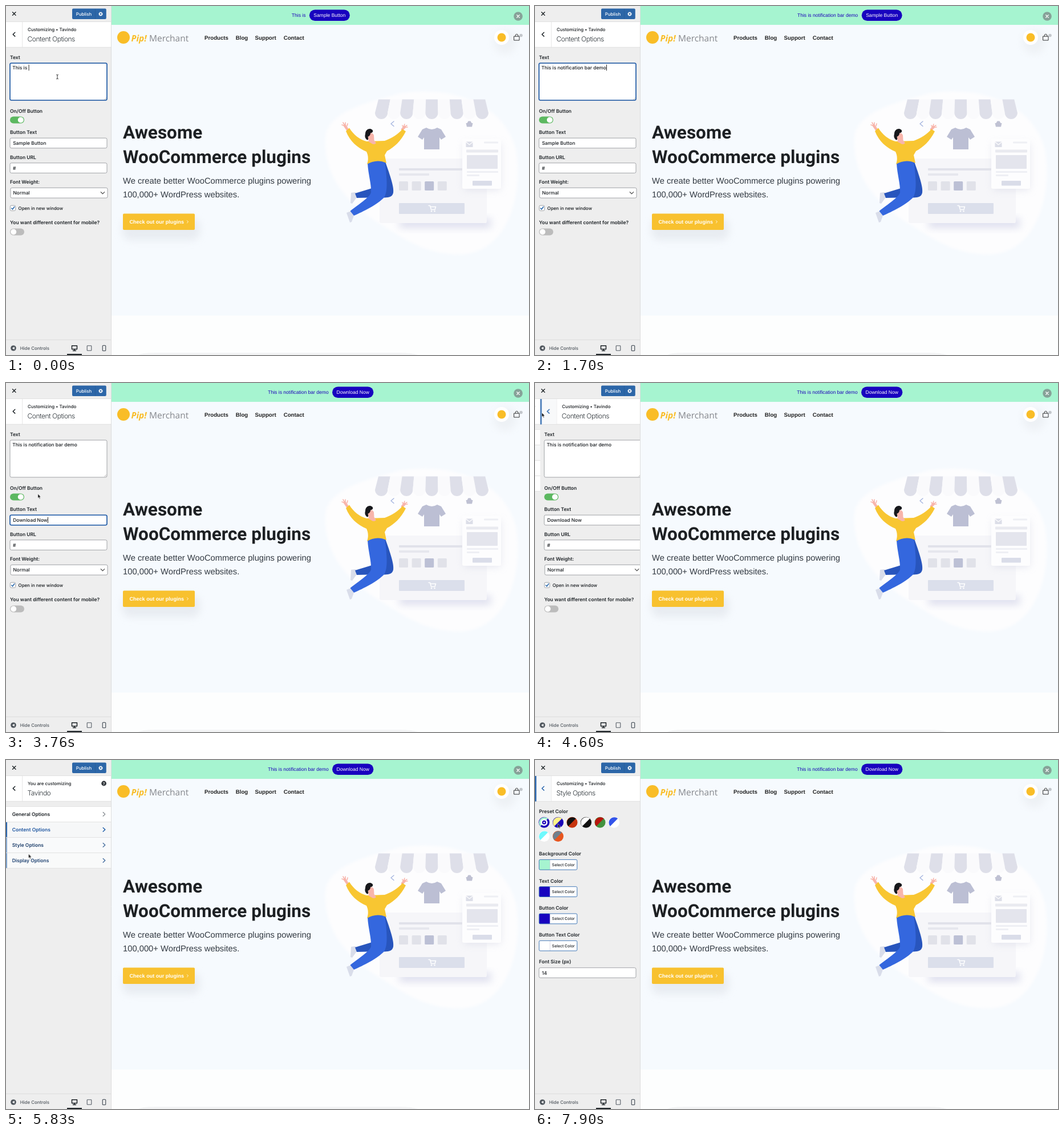
An HTML page that plays this animation: 917 by 611 pixels, repeating every 8000 ms.

```html
<!DOCTYPE html>
<html lang="en">
<head>
<meta charset="utf-8">
<title>Bar customizer</title>
<style>
html, body { margin: 0; width: 100%; height: 100%; overflow: hidden; background: #fdfefe; }
svg { display: block; width: 917px; height: 611px; }
text { font: 450 8.4px Inter, sans-serif; fill: #15191d; white-space: pre; text-rendering: geometricPrecision; }
.b { font-size: 8.52px; font-weight: 600; fill: #1d2226; }
.s { font-size: 7.88px; }
.title { font-size: 12px; font-weight: 300; letter-spacing: -.48px; fill: #2c3338; }
.ar, .nav { font-family: "Liberation Sans", Arial, sans-serif; }
.nav { font-size: 9.7px; font-weight: 700; fill: #222; }
.bar { font-size: 8.55px; fill: #1c02b8; }
.lead { font-size: 14.75px; fill: #333a42; }
.h1 { font: 700 31.5px Roboto, sans-serif; fill: #1d2023; }
.brand { font: 400 15.5px "Open Sans", sans-serif; fill: #85878c; }
.field { fill: #fff; stroke: #8c8f94; stroke-width: .8; }
.line { fill: none; stroke-linecap: round; stroke-linejoin: round; }
.blue { fill: #1d55a0; }
.focus { fill: none; stroke: #1f5cab; stroke-width: 1.6; }
.caret { fill: #111; }

#content, #list, #style, #mouse, .ibeam, .arrow, .hot { animation: 8s linear infinite; }
#content { animation-name: outRight; }
#list { animation-name: visit; }
#style { animation-name: inRight; }
#content, #list, #style { animation-timing-function: cubic-bezier(.645,.045,.355,1); }
@keyframes outRight { 0%, 57.085% { transform: none } 59.335%, 100% { transform: translateX(185px) } }
@keyframes visit {
  0%, 57.085% { transform: translateX(-185px) }
  59.335%, 82.881% { transform: none }
  85.131%, 100% { transform: translateX(-185px) }
}
@keyframes inRight { 0%, 82.881% { transform: translateX(185px) } 85.131%, 100% { transform: none } }

#mouse { animation-name: roam; }
@keyframes roam {
  0%, 21.5% { transform: translate(90px,124px) }
  24.5%, 45% { transform: translate(70px,241px) }
  53% { transform: translate(14px,55px) }
  54.5%, 66% { transform: translate(12px,52px) }
  69.5% { transform: translate(29px,109px) }
  72.875% { transform: translate(39.5px,164.5px) }
  75.5% { transform: translate(42px,153px) }
  77.9%, 88% { transform: translate(43px,151px) }
  92.5% { transform: translate(41px,114px) }
  95.7%, 100% { transform: translate(40px,111.5px) }
}
.ibeam { animation-name: ibeam; animation-timing-function: step-end; }
.arrow { animation-name: arrow; animation-timing-function: step-end; }
@keyframes ibeam {
  0% { opacity: 1 } 9.5% { opacity: 0 } 21.6% { opacity: 1 } 22.5% { opacity: 0 }
  24.2% { opacity: 1 } 28.1% { opacity: 0 } 45% { opacity: 1 } 45.5%, 100% { opacity: 0 }
}
@keyframes arrow {
  0% { opacity: 0 } 22.5% { opacity: 1 } 24.2% { opacity: 0 } 45.5%, 100% { opacity: 1 }
}
.hot.back1 { animation-name: back1; }
.hot.back2 { animation-name: back2; }
.hot.back3 { animation-name: back3; }
.hot.item0 { animation-name: item0; }
.hot.item1 { animation-name: item1; }
.hot.item2 { animation-name: item2; }
.hot.item3 { animation-name: item3; }
@keyframes back1 { 0%, 52.5% { opacity: 0 } 53.8%, 100% { opacity: 1 } }
@keyframes back2 { 0%, 59% { opacity: 0 } 60%, 67% { opacity: 1 } 68.5%, 100% { opacity: 0 } }
@keyframes back3 { 0%, 85.1% { opacity: 0 } 86.5%, 100% { opacity: 1 } }
@keyframes item0 { 0%, 67.9% { opacity: 0 } 69.3% { opacity: 1 } 70.8%, 100% { opacity: 0 } }
@keyframes item1 { 0%, 82% { opacity: 1 } 83.5%, 100% { opacity: 0 } }
@keyframes item2 {
  0%, 70.9% { opacity: 0 } 72%, 72.65% { opacity: 1 } 73.2%, 73.5% { opacity: 0 } 75%, 100% { opacity: 1 }
}
@keyframes item3 { 0%, 72.55% { opacity: 0 } 73.1%, 73.6% { opacity: 1 } 75%, 100% { opacity: 0 } }
</style>
</head>
<body>
<svg viewBox="0 0 917 611">
<defs>
  <filter id="soft" x="-40%" y="-60%" width="180%" height="220%"><feGaussianBlur stdDeviation="7"/></filter>
  <filter id="edge"><feGaussianBlur stdDeviation="2"/></filter>
  <clipPath id="side"><rect y="28" width="184" height="556"/></clipPath>
</defs>

<!-- page -->
<rect x="185" width="732" height="542" fill="#f6fafe"/>
<rect x="185" y="542" width="732" height="69" fill="#fdfefe"/>
<path d="M232 611Q238 607 262 607H690Q712 607 722 611" fill="#f3f4f5"/>
<rect x="185" width="732" height="33" fill="#a6f4d0"/>
<text id="note" class="ar bar" y="19.3"></text>
<rect id="pill" y="6.4" height="19.6" rx="9.8" fill="#1803bf"/>
<text id="pillText" class="ar bar" y="19.3" style="fill:#fff"></text>
<circle cx="898" cy="18" r="7.8" fill="#86a298"/>
<path d="M895.8 15.8l4.4 4.4m0-4.4l-4.4 4.4" class="line" stroke="#fff" stroke-width="1.3"/>

<circle cx="206" cy="55" r="11" fill="#f9bd27"/>
<text class="brand" x="219.5" y="62" style="font-weight:700;font-style:italic;fill:#f9bd27">Pip!</text>
<text class="brand" x="251" y="62">Merchant</text>
<g id="nav"></g>
<circle cx="875" cy="63" r="20" fill="#e3e6ea" opacity=".45" filter="url(#soft)"/>
<circle cx="869" cy="55" r="13" fill="#fff"/>
<circle cx="869" cy="55" r="7.5" fill="#f9bd27"/>
<path d="M891 53h9v7h-9zM893.3 53v-1.5a2.2 2.2 0 0 1 4.4 0V53" class="line" stroke="#333" stroke-width="1"/>
<circle cx="903" cy="51.5" r="2.8" fill="#c3c7cc"/>

<text class="h1" x="205" y="232">Awesome</text>
<text class="h1" x="205" y="274.7">WooCommerce plugins</text>
<text class="ar lead" x="205" y="311">We create better WooCommerce plugins powering</text>
<text class="ar lead" x="205" y="334.5">100,000+ WordPress websites.</text>
<rect x="204" y="372" width="136" height="38" rx="14" fill="#dfe3e9" opacity=".6" filter="url(#soft)"/>
<rect x="205" y="363.5" width="126" height="28.5" rx="2" fill="#f8c12f"/>
<text class="ar nav" x="216.5" y="380.6" style="font-size:9.05px;fill:#fff">Check out our plugins</text>
<path d="M317.5 375.8l2 2-2 2" class="line" stroke="#fff" stroke-width=".9"/>

<!-- shop -->
<path d="M560 230C565 182 640 168 690 153C780 138 872 170 894 250C908 330 880 430 800 435C735 437 695 405 650 378C600 345 556 300 560 230Z" fill="#fdfdfe" filter="url(#edge)"/>
<rect x="690" y="372" width="160" height="16" fill="#cfd0e6" opacity=".7" filter="url(#soft)"/>
<rect x="655" y="185" width="187" height="195" fill="#fdfdfe"/>
<rect x="655" y="267" width="188" height="113" rx="3" fill="#f6f6f9"/>
<g id="awning"></g>
<path d="M680 202l-5 4.3 5 4.3" class="line" stroke="#a3b3de" stroke-width="1.3"/>
<path d="M806.5 205h12l-1.5 6.5h-9zM808.5 205l2-3.500h4l2 3.500" fill="#bfc1d3"/>
<path d="M737 213Q746.500 219 756 213L763 216 771 229 763 234 760 230V251H733V230L730 234 722 229 730 216Z" fill="#bcbfd4"/>
<rect x="803" y="240" width="64" height="82" rx="4" fill="#cfd0e0" opacity=".5" filter="url(#soft)"/>
<rect x="800" y="232" width="68" height="88" rx="3" fill="#fdfdfe"/>
<rect x="806.500" y="237.500" width="12" height="9.500" fill="#dcdee8"/>
<path d="M806.500 238l6 5 6-5" class="line" stroke="#fff" stroke-width="1.100"/>
<g id="bars"></g>
<path d="M741 349.500h2.500l2 7h6.500l1.500-5h-9" class="line" stroke="#fff" stroke-width="1.500"/>
<circle cx="746" cy="359.300" r="1.200" fill="#fff"/><circle cx="751.500" cy="359.300" r="1.200" fill="#fff"/>

<!-- jumper -->
<path d="M605 327l8-1 2 9-8 11-3-1z" fill="#d9ddea"/>
<path d="M597 362l8-3 5 8-4 11-3 1z" fill="#d9ddea"/>
<path d="M650 271L664 270C671 290 681 316 679 327C677 336 668 336 655 335L615 336 612 328 645 318Z" fill="#2855bd"/>
<path d="M634 275C645 268 660 268 664 272C668 300 670 325 663 335C651 348 626 360 610 367L603.500 359C620 346 636 336 640 327C641 312 635 295 634 275Z" fill="#3467de"/>
<g class="line" stroke="#f8b5ab">
  <path d="M598.500 216L594 209.500M695 216L698.500 212" stroke-width="4.500"/>
  <path d="M594 210l-5-2m5 1l-3-5m4 5l0-5m3 6l1-4M697 213l-2-4m2 3l2-5m-1 5l5-3m-5 4l6-1" stroke-width="1.600"/>
</g>
<path d="M596 219L602 213.500C609 225 620 234 632 237L650 236.500 664 236C676 232 688 224 695 215.500L701 219.500C692 237 681 247 668 254L664 261 667 275C655 269 643 271 633 277C636 268 635 261 632 255C616 248 603 237 596 219Z" fill="#f8c632"/>
<path d="M634 224Q641 219 645 226L645.500 235 649 240Q645 244 640 240L636 238Z" fill="#f8b5ab"/>
<path d="M630 224C630 217 636 214 640 215.500C645 217 644 222 639 222.500C639 227 636 228 634.500 229C636 232 635 236 632.500 234C629 231 629 227 630 224Z" fill="#17181c"/>

<!-- sidebar -->
<rect width="185" height="611" fill="#eee"/>
<path d="M11.500 10.800l5.500 5.500m0-5.500l-5.500 5.500" class="line" stroke="#1d2327" stroke-width="1.400"/>
<rect x="116" y="4.500" width="59.800" height="18.500" rx="2" fill="#2c66a8"/>
<path d="M156.500 5v17.500" stroke="#275c99" stroke-width=".8"/>
<text class="s" x="122.700" y="16.700" style="fill:#fff">Publish</text>
<circle cx="166" cy="14" r="2.200" fill="none" stroke="#fff" stroke-width="1.600"/>
<circle cx="166" cy="14" r="3.300" fill="none" stroke="#fff" stroke-width="1" stroke-dasharray="1.300 1.290"/>
<path d="M0 27.500h185" stroke="#ddd" stroke-width=".8"/>

<g clip-path="url(#side)">
  <g id="content"></g>
  <g id="list"></g>
  <g id="style"></g>
</g>

<path d="M0 584.500h185" stroke="#ddd"/>
<circle cx="13" cy="599" r="4.800" fill="#50575e"/>
<path d="M14.800 596.500v5l-4-2.500z" fill="#fff"/>
<text class="s" x="24.700" y="601.800" style="fill:#50575e">Hide Controls</text>
<path d="M115.500 594.800h9v6h-9zM120 601v2.500m-2.500 0h5" class="line" stroke="#1d2327" stroke-width="1.500"/>
<path d="M107 610h26" stroke="#1d2327" stroke-width="2"/>
<rect x="142.200" y="594.800" width="7.600" height="8.400" rx=".8" class="line" stroke="#555d66" stroke-width="1.100"/>
<rect x="169.300" y="594.300" width="5.400" height="9.400" rx="1" class="line" stroke="#555d66" stroke-width="1.300"/>
<path d="M184.500 0v611" stroke="#ddd"/>

<g id="mouse">
  <path class="ibeam line" d="M-1.500-3.800Q0-3.800 0-2.800V2.800Q0 3.800-1.500 3.800M1.500-3.800Q0-3.800 0-2.800M0 2.800Q0 3.800 1.500 3.800" stroke="#222" stroke-width=".9"/>
  <path class="arrow" d="M0 0V7.300L1.700 5.800 2.900 8.700 4.100 8.200 2.900 5.400H5.200Z" fill="#111" stroke="#fff" stroke-width=".5"/>
</g>
</svg>

<script>
const $ = id => document.getElementById(id);
const text = (s, x, y, cls = '', more = '') => `<text class="${cls}" x="${x}" y="${y}" ${more}>${s}</text>`;
const box = (x, y, w, h, fill, rx = 0) => `<rect x="${x}" y="${y}" width="${w}" height="${h}" rx="${rx}" fill="${fill}"/>`;
const field = (x, y, h) => `<rect class="field" x="${x}" y="${y}" width="170" height="${h}" rx="2.5"/>`;
const chevron = (x, y, dir, color, w = 1.5) =>
  `<path class="line" d="M${x - 1.8 * dir} ${y - 3.4}l${3.6 * dir} 3.4l${-3.6 * dir} 3.4" stroke="${color}" stroke-width="${w}"/>`;

function head(small, big, hot) {
  return box(0, 28, 185, 44, '#fff')
    + '<path d="M0 72.3h185M28.7 28v44" stroke="#ddd" stroke-width=".8"/>'
    + chevron(14, 49.7, -1, '#1d2327')
    + `<g class="hot ${hot}">` + box(0, 28, 28.3, 44, '#f8f9fa') + box(0, 28, 2.4, 44.5, '#2a66ad')
    + chevron(14, 49.7, -1, '#2a66ad') + '</g>'
    + text(small, 38, 44, 's') + text(big, 37.6, 62, 'title');
}

function toggle(y, on) {
  return box(7, y - 6, 25, 12, on ? '#5cb860' : '#bcbcbc', 6)
    + `<circle cx="${on ? 25.8 : 13.2}" cy="${y}" r="5" fill="#fff"/>`;
}

$('nav').innerHTML = [['Products', 348], ['Blog', 402.7], ['Support', 436.6], ['Contact', 486.7]]
  .map(([s, x]) => text(s, x, 59, 'nav')).join('');

let awning = '';
for (let i = 0; i < 9; i++) {
  const top = 653 + i * 20.8, low = 647 + i * 22.1;
  awning += `<path d="M${top} 163.5h20.8L${low + 22.1} 187a11.05 11 0 0 1-22.1 0Z" fill="${i % 2 ? '#fafafc' : '#dedfe9'}"/>`;
}
$('awning').innerHTML = awning;

$('bars').innerHTML = [
  [838, 237.5, 25, 3, '#eeeff4'], [807, 251.5, 56, 5, '#e9eaf0'], [808, 261, 54, 24, '#e4e5ed'],
  [808, 289, 55, 3, '#eeeff4'], [808, 295, 22, 3, '#eeeff4'], [818, 306, 34, 8.5, '#dadde9'],
  [689, 284, 111, 4, '#e1e2ea'], [689, 293, 53, 4, '#e6e7ee'], [689, 345, 115, 19, '#dbdfeb']
].map(a => box(...a, 1)).join('')
  + [0, 1, 2, 3].map(i => box(689 + i * 22.6, 307, 16, 16, i == 2 ? '#bcc0d5' : '#e1e2e9', 1.5)).join('');

$('content').innerHTML = head('Customizing • Tavindo', 'Content Options', 'back1')
  + text('Text', 7, 93.2, 'b') + field(7, 100, 65)
  + '<path d="M172.5 163.8l3.5-3.5m-1.5 3.5l1.5-1.5" stroke="#888" stroke-width=".6"/>'
  + text('On/Off Button', 7, 186.5, 'b') + toggle(199.5, true)
  + text('Button Text', 7, 224, 'b') + field(7, 231.2, 17.6)
  + text('Button URL', 7, 267.7, 'b') + field(7, 274.8, 17.6) + text('#', 12, 286.7)
  + text('Font Weight:', 7, 311.2, 'b') + field(8, 318.3, 17.8) + text('Normal', 12.5, 330.3)
  + '<path class="line" d="M166.3 325.6l3.2 3.2 3.2-3.2" stroke="#444" stroke-width="1.2"/>'
  + '<rect class="field" x="7.4" y="349.2" width="9.2" height="9.2" rx="2"/>'
  + '<path class="line" d="M9.7 354l1.8 2 3.2-4.5" stroke="#2a68ab" stroke-width="1.5"/>'
  + text('Open in new window', 21.6, 356.7, 's')
  + text('You want different content for mobile?', 7, 382.2, 'b') + toggle(395.5, false)
  + '<rect id="focusArea" class="focus" x="7" y="100" width="170" height="65" rx="2.5"/>'
  + '<rect id="focusInput" class="focus" x="7" y="231.2" width="170" height="17.6" rx="2.5"/>'
  + '<rect id="mark" x="12" y="234.5" height="11" fill="#b3d4fc"/>'
  + text('', 11.2, 111.1, '', 'id="area"') + text('', 12.2, 243.2, '', 'id="input"')
  + '<rect id="caret" class="caret" width=".9" height="10.5"/>';

const items = ['General', 'Content', 'Style', 'Display'].map((name, i) => {
  const y = 81.5 + i * 27, label = name + ' Options';
  return box(0, y, 185, 27, '#fff') + text(label, 10.7, y + 16, 'b') + chevron(172, y + 13.4, 1, '#7f858b', 1.2)
    + `<g class="hot item${i}">` + box(0, y, 185, 27, '#f6f7f8') + box(0, y, 2, 27, '#2a66ad')
    + text(label, 10.7, y + 16, 'b blue') + chevron(172, y + 13.4, 1, '#2a66ad') + '</g>'
    + `<path d="M0 ${y}h185M0 ${y + 27}h185" stroke="#ddd" stroke-width=".8"/>`;
}).join('');
$('list').innerHTML = head('You are customizing', 'Tavindo', 'back2') + items
  + '<circle cx="171.6" cy="41" r="4.4" fill="#32373c"/>'
  + text('?', 171.6, 43.5, 'b', 'text-anchor="middle" style="font-size:6.8px;fill:#fff"');

const presets = [
  ['#a6f4d0', '#1c02b8'], ['#fdf287', '#1803b8'], ['#111', '#c7350f'], ['#fff', '#111'],
  ['#b8160f', '#43923e'], ['#3354ea', '#fff'], ['#6ff9fd', '#fff'], ['#70808d', '#e8561f']
].map(([a, b], i) => `<g transform="translate(${16 + i % 6 * 24.5} ${i < 6 ? 109.2 : 133.5})">
  <circle r="9.5" fill="${b}"/><path d="M-6.7 6.7A9.5 9.5 0 0 1 6.7-6.7Z" fill="${a}"/>
  ${i ? '' : '<circle r="6" fill="#fff"/><circle r="3.5" fill="#1c02b8"/><circle r="1.2" fill="#fff"/>'}</g>`).join('');
const pickers = [['Background', '#a6f4d0'], ['Text', '#1803bf'], ['Button', '#1803bf'], ['Button Text', '#fff']]
  .map(([name, color], i) => {
    const y = 174.4 + i * 47.3;
    return text(name + ' Color', 7, y - 7.2, 'b') + box(7.2, y, 66.6, 17.8, '#fff', 2) + box(7.2, y, 19, 17.8, color, 1.5)
      + `<path d="M26.3 ${y}v17.8" stroke="#ccd" stroke-width=".7"/>`
      + `<rect x="7.2" y="${y}" width="66.6" height="17.8" rx="2" fill="none" stroke="#2f6bb0" stroke-width=".9"/>`
      + text('Select Color', 29.8, y + 11.4, '', 'style="font-size:6.85px"');
  }).join('');
$('style').innerHTML = head('Customizing • Tavindo', 'Style Options', 'back3')
  + text('Preset Color', 7, 93.2, 'b') + presets + pickers
  + text('Font Size (px)', 7, 356.3, 'b') + field(7, 363.7, 17.6) + text('14', 12, 375.6);

const clamp = (v, max) => Math.max(0, Math.min(max, v));
// letters typed by time t: first at start, then one per gap
const typed = (s, t, start, gap) => s.slice(0, clamp(Math.floor((t - start) / gap) + 1, s.length));
const show = (id, on) => $(id).setAttribute('visibility', on ? 'visible' : 'hidden');
const width = id => $(id).getComputedTextLength();

function draw(t) {
  const note = 'This is ' + typed('notification bar demo', t, 760, 40);
  const label = t < 2250 ? 'Sample Button' : typed('Download Now', t, 2530, 66);
  $('area').textContent = note;
  $('input').textContent = label;
  $('note').textContent = note.trim();
  $('pillText').textContent = label.trim();

  const noteW = width('note'), pillW = width('pillText') + 14.8;
  const left = 551.8 - (noteW + 6.4 + pillW) / 2, pillX = left + noteW + 6.4;
  $('note').setAttribute('x', left);
  $('pill').setAttribute('x', pillX);
  $('pill').setAttribute('width', pillW);
  $('pillText').setAttribute('x', pillX + 7.4);

  const inArea = t < 2000, inInput = !inArea && t < 4500, marked = t >= 2100 && t < 2250;
  show('focusArea', inArea);
  show('focusInput', inInput);
  show('mark', marked);
  $('mark').setAttribute('width', width('input') + .5);

  const blinkOff = (t > 300 && t < 760) || marked || (t > 3800 && t < 4300);
  show('caret', (inArea || inInput) && !blinkOff);
  $('caret').setAttribute('x', inArea ? 11.4 + width('area') : 12.4 + width('input'));
  $('caret').setAttribute('y', inArea ? 102.6 : 234.8);
}

const start = performance.now();
function tick() {
  draw((performance.now() - start) % 8000);
  requestAnimationFrame(tick);
}
tick();
</script>
</body>
</html>
```
